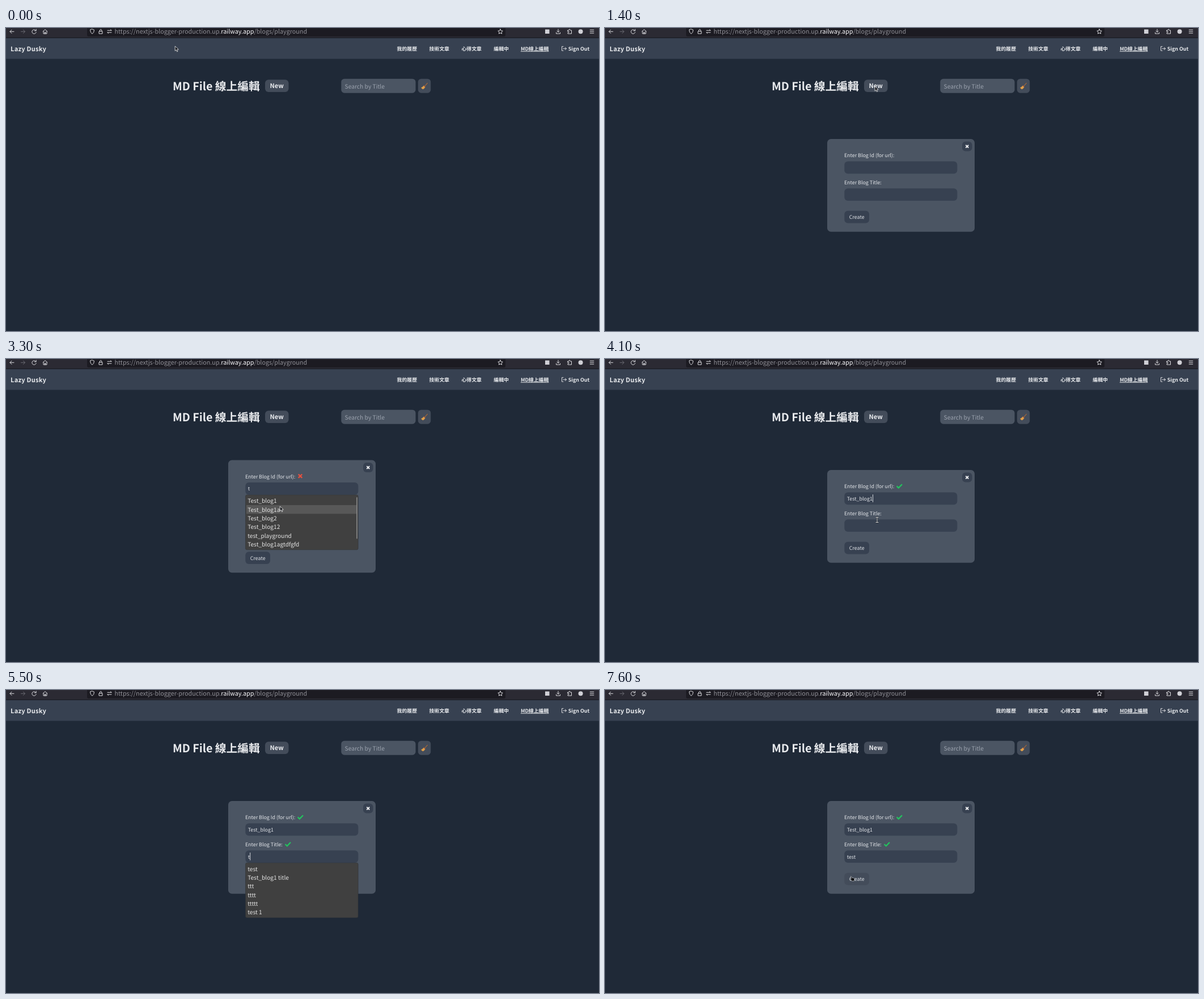
Animation of 1046 by 535 pixels, one loop 8000 ms. Source, as an HTML page:

```html
<!DOCTYPE html>
<html lang="zh-Hant">
<head>
<meta charset="utf-8">
<title>MD File 線上編輯</title>
<style>
  html, body { margin: 0; width: 100%; height: 100%; overflow: hidden; background: #1f2937; }
  svg { display: block; }
  text { font-family: "Noto Sans CJK TC", "Noto Sans CJK JP", "Noto Sans CJK", "Noto Sans", sans-serif; font-size: 8.9px; fill: #e2e5e9; white-space: pre; text-rendering: geometricPrecision; }
  .bold { font-weight: 700; fill: #e9ebee; }
  .icon { fill: none; stroke: #dcdce0; stroke-width: 1; stroke-linecap: round; stroke-linejoin: round; }
  .btn { fill: #434c5a; }
  .dark { fill: #374151; }
  .url { font-size: 10.77px; fill: #8f8f96; }
  .url tspan { fill: #fbfbfe; }
  .row { font-size: 10.15px; fill: #e4e4e4; }
  .caret { fill: #e5e7eb; }
</style>
</head>
<body>
<svg id="stage" width="1046" height="535" viewBox="0 0 1046 535">
  <defs>
    <path id="check" d="M.8 4.6 4 7.800 10.2 1.4" fill="none" stroke="#22c55e" stroke-width="2.2"/>
    <path id="cross" d="M2 1.200 8.400 7.600M8.400 1.200 2 7.600" fill="none" stroke="#e5503f" stroke-width="2.4"/>
    <path id="arrow" d="M.4 .4V8.8L2.4 7 3.8 10.2 5.2 9.6 3.9 6.5 6.6 6.3Z" fill="#16181d" stroke="#f2f2f2" stroke-width=".8"/>
    <g id="beam" fill="none">
      <path d="M-2.5-4.5H2.5M0-4.5V4.5M-2.5 4.5H2.5" stroke="#1b1f27" stroke-width="2"/>
      <path d="M-2.5-4.5H2.5M0-4.5V4.5M-2.5 4.5H2.5" stroke="#e8e8e8" stroke-width=".9"/>
    </g>
    <path id="hand" d="M.6 .6Q1.6-.2 2.2 1L3 3 6 3.3Q7.6 3.6 7.5 5L7 8.6H2.8L.4 5.6Q.4 4.6 1.6 5Z" fill="#0c0d10" stroke="#d9dce0" stroke-width=".6"/>
  </defs>

  <rect width="1046" height="535" fill="#1f2937"/>
  <rect width="1046" height="17.5" fill="#2b2a33"/>
  <path d="M143 0H881V12Q881 15 878 15H146Q143 15 143 12Z" fill="#1c1b22"/>
  <g class="icon">
    <path d="M14 6.3H7M10 3.2 7 6.3 10 9.4"/>
    <path d="M26.5 6.3H33.5M30.5 3.2 33.5 6.3 30.5 9.4" stroke="#6a6a72"/>
    <path d="M52.7 4.5A3.7 3.7 0 1 0 53.2 7.4M53.2 2.2V4.9H50.5"/>
    <path d="M65.2 6 69 2.6 72.8 6M66 5.6V10H72V5.6M68.2 10V7.5H69.8V10"/>
    <path d="M152 2 155.5 3.3Q155.6 8.3 152 10.3 148.4 8.3 148.5 3.3Z"/>
    <path d="M164.4 5.8H170V10H164.4ZM165.5 5.6V4Q167.2 .6 168.9 4V5.6"/>
    <path d="M179 4.3H186M184.3 2.8 186 4.3M179 7.9H186M180.7 9.4 179 7.9"/>
    <path d="M872 2 873.3 4.7 876.2 5.1 874.1 7.2 874.6 10.1 872 8.7 869.4 10.1 869.9 7.2 867.8 5.1 870.7 4.7Z"/>
    <path d="M974 2.2V7.2M971.8 5.2 974 7.3 976.2 5.2M970.5 8V10H977.5V8"/>
    <path d="M991 4H993V3Q994.2 1 995.2 3V4H997.5V10H991V8.2Q993.6 8 993 6.3 992 5.6 991 6Z"/>
    <path d="M1030.2 3.3H1036.8M1030.2 6.2H1036.8M1030.2 9.1H1036.8"/>
  </g>
  <rect x="951" y="2.5" width="7.5" height="7.5" fill="#d0d0d6"/>
  <circle cx="1013.6" cy="6.2" r="4" fill="#d0d0d6"/>
  <text class="url" x="191.5" y="10.2">https://nextjs-blogger-production.up.<tspan>railway.app</tspan>/blogs/playground</text>

  <rect y="17.5" width="1046" height="37" fill="#374151"/>
  <rect y="16.8" width="1046" height=".9" fill="#15141a"/>
  <text class="bold" x="8" y="41" style="font-size:11.1px;letter-spacing:.22px">Lazy Dusky</text>
  <g id="nav"></g>
  <path class="icon" d="M983 32.7H980.5V40H983M983 36.4H988.5M986.3 34.2 988.5 36.4 986.3 38.6"/>

  <text class="bold" x="293.9" y="110.3" style="font-size:19.7px">MD File 線上編輯</text>
  <rect id="newBtn" class="btn" x="457" y="91.3" width="41.5" height="21.7" rx="6"/>
  <text class="bold" x="477.7" y="106" text-anchor="middle" style="font-size:11.1px">New</text>
  <rect x="591.3" y="89.7" width="131.2" height="25" rx="5.5" fill="#4b5563"/>
  <text x="597.6" y="106.6" style="font-size:10.25px;fill:#9ca3af">Search by Title</text>
  <rect class="btn" x="726.8" y="89.7" width="22.4" height="25" rx="5.5"/>
  <path d="M743.3 97.4 738.6 102.6" stroke="#a5683a" stroke-width="1.2" stroke-linecap="round"/>
  <path d="M737 101.6 739.6 104.1Q738 107.600 735.3 108.2 733.2 107.200 732.2 105.2 734.800 104.6 737 101.6Z" fill="#dfa04a"/>
  <path d="M736.8 102 739.4 104.4" stroke="#b8483a"/>

  <g id="modal">
    <rect id="panel" x="392" width="260" rx="6.5" fill="#4b5563"/>
    <g id="idPart">
      <rect class="dark" x="630" y="200.5" width="17.5" height="17" rx="6"/>
      <path d="M636.3 206.6 641.2 211.5M641.2 206.6 636.3 211.5" stroke="#f3f4f6" stroke-width="1.8"/>
    </g>
    <g id="titlePart"></g>
    <g id="createPart">
      <rect id="createBtn" x="422.3" y="322.7" width="43.7" height="21.8" rx="6"/>
      <text x="444.2" y="337.4" text-anchor="middle">Create</text>
    </g>
    <g id="popup"></g>
  </g>
  <use id="cursor"/>
</svg>
<script>
const LOOP = 8000, TICK = 100;
const $ = id => document.getElementById(id);

function set(el, attrs) {
  for (const k in attrs) el.setAttribute(k, attrs[k]);
}
function add(parent, tag, attrs, text) {
  const el = document.createElementNS('http://www.w3.org/2000/svg', tag);
  set(el, attrs);
  if (text) el.textContent = text;
  return parent.appendChild(el);
}
const show = (el, on) => el.setAttribute('visibility', on ? 'inherit' : 'hidden');
const shift = (el, dy) => el.setAttribute('transform', `translate(0 ${dy})`);

[[689.6, '我的履歷'], [746.5, '技術文章'], [803.4, '心得文章'], [860.3, '編輯中'],
 [907.9, 'MD線上編輯'], [991.8, 'Sign Out']].forEach(([x, label], i) =>
  add($('nav'), 'text', { class: 'bold', x, y: 39.9, 'text-decoration': i === 4 ? 'underline' : 'none' }, label));

function makeField(parent, label, top, markX) {
  add(parent, 'text', { x: 421.9, y: top - 7.4 }, label);
  const mark = add(parent, 'use', { x: markX, y: top - 15.6 });
  add(parent, 'rect', { class: 'dark', x: 422.3, y: top, width: 199, height: 21.8, rx: 6 });
  const text = add(parent, 'text', { x: 426.7, y: top + 14.5 });
  const caret = add(parent, 'rect', { class: 'caret', y: top + 3.8, width: .9, height: 13.6 });
  return { mark, text, caret };
}
const idField = makeField($('idPart'), 'Enter Blog Id (for url):', 235.4, 513.8);
const titleField = makeField($('titlePart'), 'Enter Blog Title:', 283.3, 491.8);

function drawField(field, value, mark, focused) {
  field.text.textContent = value;
  show(field.mark, mark);
  if (mark) field.mark.setAttribute('href', '#' + mark);
  show(field.caret, focused);
  if (focused) field.caret.setAttribute('x', 426.9 + (value ? field.text.getComputedTextLength() : 0));
}

const ROW = 15.3;
const LISTS = {
  ids: ['Test_blog1', 'Test_blog1a', 'Test_blog2', 'Test_blog12', 'test_playground', 'Test_blog1agtdfgfd'],
  t: ['test', 'Test_blog1 title', 'ttt', 'tttt', 'ttttt', 'test 1'],
  te: ['test', 'Test_blog1 title', 'test 1', 'test 2']
};

function drawPopup(name, hover) {
  const box = $('popup');
  box.replaceChildren();
  if (!name) return;
  const rows = LISTS[name], top = name === 'ids' ? 240 : 305.3;
  add(box, 'rect', { x: 422.5, y: top, width: 198.6, height: rows.length * ROW + 5, rx: 2.5, fill: '#404040', stroke: '#303337', 'stroke-width': .6 });
  if (hover >= 0)
    add(box, 'rect', { x: 424, y: top + 2.7 + hover * ROW, width: 195.5, height: ROW, fill: '#585858' });
  rows.forEach((r, i) => add(box, 'text', { class: 'row', x: 426.2, y: top + 14.3 + i * ROW }, r));
  if (name === 'ids')
    add(box, 'rect', { x: 618.2, y: 244, width: 1.6, height: 73.5, rx: .8, fill: '#8c8c8c' });
}

// Vertical growth of the panel when a field shows an error.
const GROW = { none: 0, id: 17.5, title: 13 };

const START = { open: 0, error: 'none', id: '', title: '', idMark: '', titleMark: '', focus: '', list: '', hover: -1, newHot: 0, createHot: 0 };
const STEPS = [
  [1200, { newHot: 1 }],
  [1400, { newHot: 0, open: 1 }],
  [2300, { focus: 'id' }],
  [3200, { id: 't', idMark: 'cross', error: 'id', focus: '' }],
  [3300, { list: 'ids', hover: 1 }],
  [3500, { hover: 0 }],
  [3800, { hover: -1 }],
  [3900, { hover: 0 }],
  [4100, { id: 'Test_blog1', idMark: 'check', error: 'none', list: '', focus: 'id' }],
  [4400, { focus: 'title', error: 'title', titleMark: 'cross' }],
  [5500, { title: 't', titleMark: 'check', error: 'none', list: 't', hover: -1 }],
  [5800, { title: 'te', list: 'te' }],
  [6100, { title: 'tes' }],
  [6300, { title: 'test' }],
  [7000, { list: '', focus: '' }],
  [7500, { createHot: 1 }]
];

// [time, shape, x, y]; a fifth value marks a glide to the next entry.
const CURSOR = [
  [0, 'arrow', 297.8, 31.6], [300, ''],
  [500, 'arrow', 72, 224, 1], [1200, 'arrow', 475.6, 102.4],
  [1500, 'arrow', 475, 90], [1600, 'arrow', 475, 78, 1], [2100, 'beam', 484, 250],
  [2500, 'arrow', 483, 260], [2600, 'arrow', 482.6, 265],
  [2800, 'arrow', 482.8, 263, 1], [3000, 'arrow', 482.8, 258.6],
  [3300, 'arrow', 482.8, 259.6], [3500, 'arrow', 482.8, 255], [3600, 'arrow', 482.8, 251.5],
  [3800, 'beam', 482, 229], [3900, 'arrow', 482, 250],
  [4100, 'beam', 480, 284], [4200, 'beam', 480.5, 285],
  [4700, 'beam', 483, 288], [4800, 'arrow', 484, 296],
  [5500, ''], [6300, 'beam', 483.5, 295], [6500, 'beam', 498, 301.5],
  [6800, 'arrow', 396, 299], [7000, 'arrow', 392.3, 299.5], [7200, 'arrow', 425, 323.5],
  [7500, 'hand', 448, 327], [7600, 'hand', 432.6, 328.6]
];

function cursorAt(t) {
  let i = CURSOR.length - 1;
  while (CURSOR[i][0] > t) i--;
  const [t0, shape, x, y, glide] = CURSOR[i];
  if (!glide) return { shape, x, y };
  const [t1, , x1, y1] = CURSOR[i + 1];
  const p = (t - t0) / (t1 - t0), k = p * p * (3 - 2 * p);
  return { shape, x: x + (x1 - x) * k, y: y + (y1 - y) * k };
}

function draw(t) {
  const s = Object.assign({}, START, ...STEPS.filter(([at]) => at <= t).map(([, change]) => change));
  const g = GROW[s.error];
  show($('modal'), s.open);
  set($('panel'), { y: 196 - g, height: 163.7 + 2 * g });
  shift($('idPart'), -g);
  shift($('titlePart'), s.error === 'id' ? g : -g);
  shift($('createPart'), g);
  drawField(idField, s.id, s.idMark, s.focus === 'id');
  drawField(titleField, s.title, s.titleMark, s.focus === 'title');
  drawPopup(s.list, s.hover);
  $('newBtn').style.fill = s.newHot ? '#4b5563' : '#434c5a';
  $('createBtn').style.fill = s.createHot ? '#434c5a' : '#374151';

  const c = cursorAt(t);
  show($('cursor'), c.shape);
  if (c.shape) set($('cursor'), { href: '#' + c.shape, x: c.x, y: c.y });
}

const begin = performance.now();
let last = -1;
function frame() {
  const t = Math.floor((performance.now() - begin) % LOOP / TICK) * TICK;
  if (t !== last) draw(last = t);
  requestAnimationFrame(frame);
}
frame();
</script>
</body>
</html>
```
